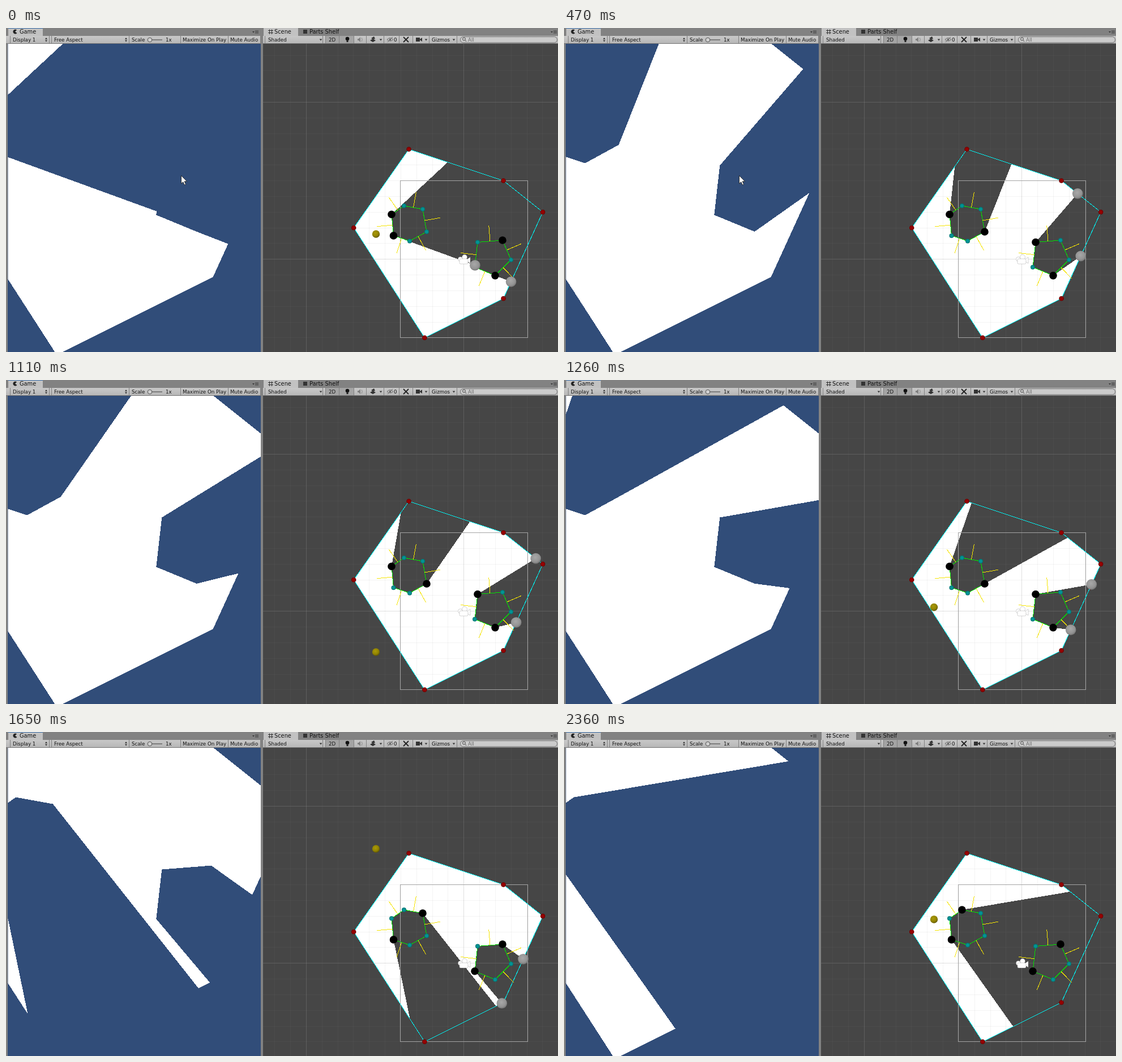
Write an HTML page that moves like this. It is 975 px wide and 574 px high and loops after 2.44 s.

```html
<!DOCTYPE html>
<html lang="en">
<head>
<meta charset="utf-8">
<title>2D light and shadow</title>
<style>
html, body { margin: 0; width: 100%; height: 100%; overflow: hidden; background: #828282; }
svg { display: block; }
text { font: 8.7px "DejaVu Sans", sans-serif; fill: #111; }
.tab { font-size: 9.8px; }
.crisp { shape-rendering: crispEdges; }
</style>
</head>
<body>
<svg id="stage" width="975" height="574" viewBox="0 0 975 574">
  <defs>
    <radialGradient id="grey" cx=".45" cy=".4" r=".6"><stop offset="0" stop-color="#a8a8a8"/><stop offset=".7" stop-color="#949494"/><stop offset="1" stop-color="#777"/></radialGradient>
    <radialGradient id="gold" cx=".42" cy=".38" r=".62"><stop offset="0" stop-color="#aa9a08"/><stop offset=".65" stop-color="#928400"/><stop offset="1" stop-color="#625800"/></radialGradient>
    <radialGradient id="teal"><stop offset=".5" stop-color="#009595"/><stop offset="1" stop-color="#007070"/></radialGradient>
    <radialGradient id="red"><stop offset=".5" stop-color="#980000"/><stop offset="1" stop-color="#680000"/></radialGradient>
    <linearGradient id="tool" x2="0" y2="1"><stop offset="0" stop-color="#c8c8c8"/><stop offset="1" stop-color="#b6b6b6"/></linearGradient>
    <clipPath id="gameClip"><rect x="3.5" y="28" width="446.5" height="546"/></clipPath>
    <mask id="shade" maskUnits="userSpaceOnUse" x="560" y="180" width="440" height="400">
      <rect x="560" y="180" width="440" height="400" fill="#fff"/>
      <g id="shadows" class="crisp"></g>
    </mask>
  </defs>

  <rect class="crisp" x="3" y="28" width="447" height="546" fill="#314d79"/>
  <g clip-path="url(#gameClip)">
    <use href="#lit" transform="translate(-1376.6 -509) scale(1.983)"/>
  </g>

  <rect class="crisp" x="454" y="28" width="521" height="546" fill="#464646"/>
  <g id="lit" class="crisp"><g mask="url(#shade)"><polygon id="room" fill="#fff"/></g></g>
  <g id="grid" class="crisp"></g>
  <rect class="crisp" x="696.5" y="270.5" width="225" height="278" fill="none" stroke="#a4a4a4"/>
  <g id="lines" class="crisp" fill="none"></g>
  <g id="dots"></g>
  <g id="camera" fill="#fff" stroke="#8a8a8a" stroke-opacity=".45" stroke-width=".8">
    <path d="M814 410l6-4v11l-6-4z"/>
    <circle cx="802.5" cy="409.5" r="4"/><circle cx="810" cy="406" r="4.500"/>
    <rect x="801" y="409" width="15" height="9" rx="2"/>
  </g>
  <g id="marks"></g>

  <g id="bars" class="crisp"></g>
  <g id="icons"></g>
  <path id="cursor" d="M309.5 261.5v14.2l3.3-3 2.3 5.2 2.4-1-2.3-5.1h4.4z" fill="#fff" stroke="#222" stroke-width=".9"/>
</svg>
<script>
const $ = id => document.getElementById(id);
const NS = 'http://www.w3.org/2000/svg';
function add(parent, tag, attrs, text) {
  const el = document.createElementNS(NS, tag);
  for (const k in attrs) el.setAttribute(k, attrs[k]);
  if (text) el.textContent = text;
  return $(parent).appendChild(el);
}
const rect = (x, y, width, height, fill, g = 'bars') => add(g, 'rect', { x, y, width, height, fill });
const line = (g, x1, y1, x2, y2, stroke, w = 1) => add(g, 'line', { x1, y1, x2, y2, stroke, 'stroke-width': w });
const path = (d, fill = '#333', stroke = 'none') => add('icons', 'path', { d, fill, stroke });
const dot = (g, x, y, r, fill) => add(g, 'circle', { cx: x, cy: y, r, fill });
const label = (x, y, s, cls = '', fill = '') =>
  add('icons', 'text', { x, y, class: cls, style: fill && 'fill:' + fill }, s);

// Scene geometry
const UNIT = 27.83;
const room = [[-3.5, 7], [2.5, 5], [5, 3], [2.5, -2.5], [-2.5, -5], [-7, 2]]
  .map(([x, y]) => [809 + x * UNIT, 409.6 - y * UNIT]);
const blocks = [
  [[703, 315], [736, 321], [743, 361], [713, 377.5], [684.5, 367.9], [681, 330.3]],
  [[833, 379.5], [877, 376], [892, 410.7], [864, 438.6], [828, 423.7]]
];
const LIGHT_X = 653;

function drawScene() {
  const gridColor = i => i === 0 || i === 10 ? 'rgba(150,150,150,.3)' : 'rgba(128,128,128,.09)';
  for (let i = -2; i < 17; i++) {
    const x = Math.round(530 + i * UNIT) + .5;
    if (x > 454) line('grid', x, 28, x, 574, gridColor(i));
  }
  for (let i = -3; i < 16; i++) {
    const y = Math.round(131 + i * UNIT) + .5;
    line('grid', 454, y, 975, y, gridColor(i));
  }
  $('room').setAttribute('points', room.join(' '));
  add('lines', 'polygon', { points: room.join(' '), stroke: '#00f0f0' });
  for (const b of blocks) {
    add('lines', 'polygon', { points: b.join(' '), stroke: '#00e400' });
    b.forEach(([x, y], i) => {
      const [u, v] = b[(i + 1) % b.length], len = Math.hypot(u - x, v - y);
      const mx = (x + u) / 2, my = (y + v) / 2;
      line('lines', mx, my, mx + (v - y) / len * UNIT, my - (u - x) / len * UNIT, '#f5e400');
    });
    b.forEach(p => dot('dots', p[0], p[1], 4, 'url(#teal)'));
  }
  room.forEach(p => dot('dots', p[0], p[1], 4.3, 'url(#red)'));
}

function drawUi() {
  rect(0, 0, 975, 14, '#828282');
  rect(0, 14, 975, 14, 'url(#tool)');
  rect(0, 27, 975, 1, '#747474');
  rect(0, 28, 3, 546, '#828282');
  rect(450, 0, 4, 574, '#828282');
  rect(4, 0, 61, 14, '#c2c2c2');
  rect(4, 0, 61, 1, '#3b6ea8');
  rect(455, 0, 61, 14, '#c2c2c2');
  rect(564, 14, 24, 13, '#a4a4a4');
  rect(589, 14, 25, 13, '#a4a4a4');
  [7, 76, 80, 217, 308, 392, 449, 457, 559, 564, 588, 614, 636, 667, 694, 718, 747, 796]
    .forEach(x => rect(x, 14, 1, 13, '#808080'));

  label(24, 10, 'Game', 'tab');
  label(474, 10, 'Scene', 'tab');
  label(536, 10, 'Parts Shelf', 'tab');
  [[12, 'Display 1'], [85, 'Free Aspect'], [222, 'Scale'], [282, '1x'], [312, 'Maximize On Play'],
   [396, 'Mute Audio'], [463, 'Shaded'], [570, '2D'], [685, '0'], [752, 'Gizmos']]
    .forEach(([x, s]) => label(x, 24, s));

  // Tab icons and pane menus
  path('M19 3.5A4 4 0 1 0 19.5 9L16 6.5z', '#222');
  [465.5, 469.5].forEach(x => line('icons', x, 2.5, x, 11, '#333'));
  [4.5, 8.5].forEach(y => line('icons', 463, y, 472, y, '#333'));
  rect(525, 3, 7, 7, '#333', 'icons');
  for (const x of [435, 962]) {
    path(`M${x} 6h4l-2 2.5z`);
    [5, 7, 9].forEach(y => line('icons', x + 5, y, x + 11, y, '#444'));
  }
  // Drop-down arrows
  [71, 212].forEach(x => path(`M${x - 2} 20l2-3 2 3zM${x - 2} 21.5h4l-2 3z`));
  [556, 662, 742, 791].forEach(x => path(`M${x - 2.3} 19.5h4.6l-2.3 3z`));
  // Scale slider
  line('icons', 250, 21, 276, 21, '#666', 1.5);
  add('icons', 'circle', { cx: 254, cy: 21, r: 3.8, fill: '#d0d0d0', stroke: '#555' });
  // Scene tools
  dot('icons', 603, 19, 3.3, '#111');
  rect(601.5, 21, 3, 4, '#222', 'icons');
  path('M621 19h2l3-3v9l-3-3h-2z', '#808080');
  path('M628 17q2.5 3.5 0 7', 'none', '#888');
  path('M643 22l5-3 5 3-5 3z');
  path('M645 18l5-3 2 4-4 1z');
  path('M673 20.5q5.5-6 11 0q-5.5 5-11 0z', 'none', '#666');
  dot('icons', 678.5, 20.5, 1.8, '#666');
  line('icons', 674, 25, 683, 16, '#666');
  line('icons', 702, 16, 711, 25, '#222', 1.8);
  line('icons', 711, 16, 702, 25, '#222', 1.8);
  rect(724, 17, 7, 7, '#333', 'icons');
  path('M731 20l4-3v7l-4-3z');
  // Search box
  add('icons', 'rect', { x: 802.5, y: 15.5, width: 171, height: 10.5, rx: 5.2, fill: '#cbcbcb', stroke: '#707070' });
  add('icons', 'circle', { cx: 809, cy: 19.5, r: 2.5, fill: 'none', stroke: '#444' });
  line('icons', 811, 21.5, 813, 24, '#444');
  label(816, 24, 'All', '', '#6c6c6c');
}

// Light motion, [step, y]; the shadows trail the ball by one tick
const keys = [[0, 365], [5, 549], [6, 597], [8, 675], [9, 681], [10, 641], [12, 567], [14, 482],
  [18, 323], [21, 207], [23, 135], [25, 135], [26, 173], [30, 332], [31, 365]];
const LOOP = 2440, LAG = 8.6, CURSOR_END = 790;
const shortSteps = [4, 14, 18, 25];
function stepAt(t) {
  let k = 0, end = 0;
  while (k < 31 && t >= (end += shortSteps.includes(k) ? 70 : 80)) k++;
  return Math.min(k, 30);
}
function lightAt(k) {
  const i = keys.findIndex((p, n) => k < keys[n + 1][0]);
  const [a, y] = keys[i], [b, z] = keys[i + 1];
  return y + (z - y) * (k - a) / (b - a);
}
const heading = k => k < 9 || k > 25 ? 1 : k < 23 ? -1 : 0;

const slope = (p, ly) => (p[1] - ly) / (p[0] - LIGHT_X);
function tangents(block, ly) {
  const s = [...block].sort((a, b) => slope(a, ly) - slope(b, ly));
  return [s[0], s[s.length - 1]];
}
// First crossing of the ray light -> p with a polygon, beyond p
function hit(p, ly, poly) {
  const dx = p[0] - LIGHT_X, dy = p[1] - ly;
  let best = Infinity;
  poly.forEach((a, i) => {
    const b = poly[(i + 1) % poly.length], ex = b[0] - a[0], ey = b[1] - a[1];
    const det = dx * ey - dy * ex, ax = a[0] - LIGHT_X, ay = a[1] - ly;
    const u = (ax * ey - ay * ex) / det, w = (ax * dy - ay * dx) / det;
    if (w >= 0 && w <= 1 && u > 1.001) best = Math.min(best, u);
  });
  return best < Infinity ? [LIGHT_X + dx * best, ly + dy * best] : null;
}

drawScene();
drawUi();
const casts = blocks.map(b => {
  add('shadows', 'polygon', { points: b.join(' '), fill: '#000' });
  return add('shadows', 'polygon', { fill: '#000' });
});
const ball = dot('marks', 0, 0, 6.7, 'url(#gold)');
const blacks = [0, 1, 2, 3].map(() => dot('marks', 0, 0, 6.8, '#000'));
const greys = [0, 1, 2, 3].map(() => dot('marks', 0, 0, 9.3, 'url(#grey)'));
const show = (el, on) => el.setAttribute('visibility', on ? 'visible' : 'hidden');
function place(el, p) {
  show(el, p);
  if (p) { el.setAttribute('cx', p[0]); el.setAttribute('cy', p[1]); }
}

function render(t) {
  const k = stepAt(t), y = lightAt(k), ly = y - LAG * heading(k);
  show($('cursor'), t < CURSOR_END);
  place(ball, [LIGHT_X + .5, y]);
  const edges = blocks.map(b => tangents(b, ly));
  const [top, bottom] = edges[0].map(p => slope(p, ly));
  edges.forEach((pair, i) => {
    const far = pair.map(p => [p[0] + (p[0] - LIGHT_X) * 40, p[1] + (p[1] - ly) * 40]);
    casts[i].setAttribute('points', [pair[0], far[0], far[1], pair[1]].join(' '));
    pair.forEach((p, j) => {
      const n = i * 2 + j, s = slope(p, ly);
      place(blacks[n], p);
      const hidden = i === 1 && s > top && s < bottom;
      place(greys[n], hidden ? null : hit(p, ly, i ? room : blocks[1]));
    });
  });
}

const start = performance.now();
function loop() {
  render((performance.now() - start) % LOOP);
  requestAnimationFrame(loop);
}
loop();
</script>
</body>
</html>
```
